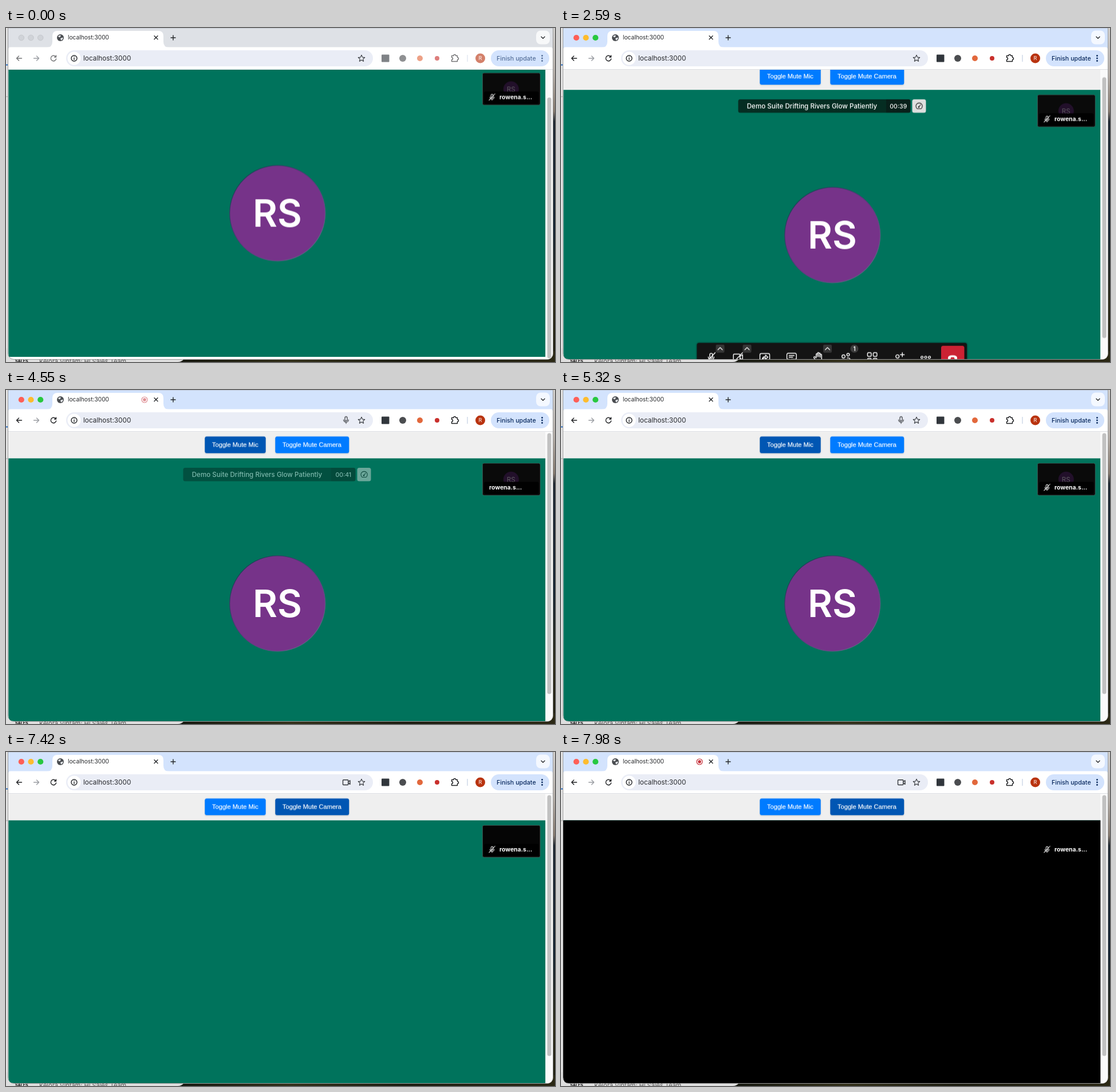
Write an HTML page that moves like this. It is 959 px wide and 584 px high and loops after 8000 ms.

```html
<!DOCTYPE html>
<html lang="en">
<head>
<meta charset="utf-8">
<title>Call controls demo</title>
<style>
  html, body { margin: 0; width: 100%; height: 100%; overflow: hidden; background: #e4e4e4; }
  svg { display: block; width: 959px; height: 584px; }
  text { font-family: Inter, "Open Sans", sans-serif; white-space: pre; }
  .mid { text-anchor: middle; }
  .btn text { font: 11.1px "Liberation Sans", Arial, sans-serif; fill: #fff; stroke: #fff; stroke-width: .2; }
  .line { fill: none; stroke: currentColor; stroke-width: 1.4; stroke-linecap: round; stroke-linejoin: round; }
  .thin { stroke-width: 1.1; }
  .call { color: #fff; }
  .call text { fill: #fff; }
  #tools { color: #1f2023; }
</style>
</head>
<body>
<svg viewBox="0 0 959 584" xmlns="http://www.w3.org/2000/svg">
  <defs>
    <clipPath id="pageClip"><path d="M4 73H955V569Q955 579 945 579H14Q4 579 4 569Z"/></clipPath>
    <clipPath id="stageClip"><rect x="4.4" y="119.5" width="938" height="505"/></clipPath>
    <linearGradient id="sideSky" x2="0" y2="1">
      <stop offset="0" stop-color="#d2d0ce"/><stop offset=".14" stop-color="#b5aea8"/>
      <stop offset=".25" stop-color="#85796e"/><stop offset=".28" stop-color="#1c2630"/>
      <stop offset=".6" stop-color="#132231"/><stop offset=".82" stop-color="#2b2a17"/>
      <stop offset="1" stop-color="#1d1c10"/>
    </linearGradient>
    <linearGradient id="ground">
      <stop offset="0" stop-color="#15170f"/><stop offset=".3" stop-color="#33301a"/>
      <stop offset=".6" stop-color="#1c1c10"/><stop offset="1" stop-color="#2b2815"/>
    </linearGradient>
    <linearGradient id="rim" x2="1" y2="1">
      <stop offset=".15" stop-color="#1d4458"/><stop offset=".5" stop-color="#5a3a7c"/>
      <stop offset=".85" stop-color="#5d6584"/>
    </linearGradient>
    <filter id="soft" x="-10%" y="-40%" width="120%" height="180%" color-interpolation-filters="sRGB">
      <feDropShadow dx="0" dy="1.3" stdDeviation="1.3" flood-opacity=".12"/>
    </filter>
    <filter id="glow" x="-5%" y="-20%" width="110%" height="140%" color-interpolation-filters="sRGB">
      <feDropShadow dx="0" dy="0" stdDeviation="1.6" flood-opacity=".75"/>
    </filter>
    <g id="mic" class="line">
      <path d="M-2.4-4.5a2.4 2.4 0 0 1 4.8 0v4a2.4 2.4 0 0 1-4.8 0zM-5-.5a5 5 0 0 0 10 0M0 4.5V7"/>
    </g>
    <g id="micOff"><use href="#mic"/><path class="line" d="M-7 7L7-8"/></g>
    <g id="cam" class="line">
      <rect x="-8" y="-5.5" width="11.5" height="11" rx="1.5"/><path d="M3.5-1.5L8-4.5V4.5L3.5 1.5"/>
    </g>
    <g id="camOff"><use href="#cam"/><path class="line" d="M-7 8L8-8"/></g>
    <g id="share" class="line">
      <rect x="-8.5" y="-6.5" width="17" height="13.5" rx="2.2"/>
      <path d="M-4.5 3.8Q-4-1.2 1.2-1.2V-3.8L5.5-.2L1.2 3.4V1Q-2.5 1-4.5 3.8Z"/>
    </g>
    <g id="chat" class="line">
      <path d="M-6-7H6a2.3 2.3 0 0 1 2.3 2.3V1.5A2.3 2.3 0 0 1 6 3.8H-.5L-4 7V3.8H-6A2.3 2.3 0 0 1-8.3 1.5V-4.7A2.3 2.3 0 0 1-6-7ZM-4.5-3H4.5M-4.5 0H2"/>
    </g>
    <g id="hand" class="line">
      <path d="M-4 1V-5a1.2 1.2 0 0 1 2.4 0V-1V-7a1.2 1.2 0 0 1 2.4 0V-1V-6a1.2 1.2 0 0 1 2.4 0V0V-4a1.2 1.2 0 0 1 2.4 0V3Q5.5 8 .5 8Q-3 8-5 5L-8 .8a1.2 1.2 0 0 1 2-1.3Z"/>
    </g>
    <g id="people" class="line">
      <circle cx="-3" cy="-1.5" r="2.8"/><circle cx="5" cy="-4.5" r="2.3"/>
      <path d="M-8.5 8Q-8.5 4-3 4Q2.5 4 2.5 8ZM3.5 1.2Q8.5.5 8.5 5H5"/>
    </g>
    <rect id="cell" class="line" width="6.5" height="6.5" rx="1.5"/>
    <g id="tiles">
      <use href="#cell" x="-8" y="-8"/><use href="#cell" x="2" y="-8"/>
      <use href="#cell" x="-8" y="2"/><use href="#cell" x="2" y="2"/>
    </g>
    <g id="invite" class="line">
      <circle cx="-2.5" cy="-1.5" r="2.9"/><path d="M-8 8Q-8 4-2.5 4Q3 4 3 8ZM6-8V-1M2.5-4.5H9.5"/>
    </g>
    <g id="more" class="line"><circle cx="-6.5" r="1.9"/><circle r="1.9"/><circle cx="6.5" r="1.9"/></g>
    <g id="notch">
      <rect x="-7.5" y="-7" width="15" height="14" rx="2" fill="#363636"/>
      <path class="line thin" d="M-4 2L0-2L4 2"/>
    </g>
  </defs>

  <!-- desktop behind the window -->
  <rect width="959" height="584" fill="#e4e4e4"/>
  <path d="M0 120H4" stroke="#aaa"/>
  <rect y="63.5" width="4" height="2" fill="#2d6fc4"/>
  <rect x="940" width="19" height="584" fill="url(#sideSky)"/>
  <rect x="300" y="565" width="659" height="19" fill="url(#ground)"/>
  <path d="M0 560H318Q314 584 300 584H0Z" fill="#dedede"/>
  <text x="16" y="584.5" font-size="7" font-weight="800" fill="#222">SALES</text>
  <text x="58" y="587" font-size="11" fill="#555">Kelora Vintam: Hi Sales Team</text>
  <rect x="3.5" y="-12" width="952" height="591.5" rx="10.5" fill="#fff" stroke="#9b9b9b"/>

  <!-- browser tab strip -->
  <rect id="strip" x="4" width="951" height="50" fill="#dee1e6"/>
  <path d="M4 .5H955" stroke="#b9bec8" opacity=".6"/>
  <rect x="4" y="33.5" width="951" height="39" rx="4" fill="#fff"/>
  <path d="M71 34Q81 34 81 24V14Q81 5 90 5H266Q275 5 275 14V24Q275 34 285 34Z" fill="#fff"/>
  <g id="lightsOff" fill="#d0d3d8" stroke="#bdc0c5" stroke-width=".7">
    <circle cx="26.8" cy="17" r="4.8"/><circle cx="43.5" cy="17" r="4.8"/><circle cx="60.2" cy="17" r="4.8"/>
  </g>
  <g id="lightsOn">
    <circle cx="26.8" cy="17" r="5.1" fill="#fe5f57"/><circle cx="43.5" cy="17" r="5.1" fill="#febc2e"/>
    <circle cx="60.2" cy="17" r="5.1" fill="#28c840"/>
  </g>
  <circle cx="95" cy="17" r="6" fill="#4a4d51"/>
  <path d="M91 14.5Q93 12 96 13L94.5 16Q92 17 91 14.5ZM95 18L99.5 16.5Q100 20 96 21.5Z" fill="#e8eaed"/>
  <text x="108" y="20.3" font-size="10.2" fill="#26282b">localhost:3000</text>
  <g id="rec">
    <circle cx="242" cy="17" r="5" fill="none" stroke="#c5303a" stroke-width="1.2"/><circle cx="242" cy="17" r="2.8" fill="#c5303a"/>
  </g>
  <path class="line" color="#26282b" d="M259 13.8L265 19.8M265 13.8L259 19.8M288 17H296M292 13V21"/>
  <rect x="926" y="4.5" width="24" height="24" rx="8" fill="#fff" opacity=".75"/>
  <path class="line" color="#26282b" d="M935 15.2L938 18.2L941 15.2"/>

  <!-- browser toolbar -->
  <rect x="105" y="39" width="536" height="28" rx="14" fill="#eaedf6"/>
  <circle cx="119" cy="53" r="11.5" fill="#fff"/>
  <g class="line" color="#26282b"><circle cx="119" cy="53" r="5"/><path d="M119 52.5V55.5M119 50.3V50.4"/></g>
  <text x="135" y="57" font-size="11.8" fill="#26282b">localhost:3000</text>
  <path class="line" color="#9a9da2" d="M48.5 53H57.5M53.5 49L57.5 53L53.5 57"/>
  <path class="line thin" color="#33363a" d="M621 47.3L622.7 51.1L626.8 51.5L623.7 54.2L624.6 58.2L621 56.1L617.4 58.2L618.3 54.2L615.2 51.5L619.3 51.1Z"/>
  <g color="#33363a">
    <g id="urlMic"><use href="#mic" transform="translate(594 52.5) scale(.85)"/></g>
    <g id="urlCam" class="line">
      <rect x="588.5" y="48.7" width="9.3" height="8.8" rx="1"/><path d="M598.2 51.8L601 49.8V56.4L598.2 54.4"/>
    </g>
  </g>
  <rect x="847" y="39" width="102" height="28" rx="14" fill="#d3e3fd"/>
  <g id="tools">
    <path class="line" d="M27.5 53H18.5M22.5 49L18.5 53L22.5 57M87 50.5A4.7 4.7 0 1 0 87.6 54M87.5 48V51H84.5"/>
    <rect x="656" y="46.5" width="13.5" height="13" rx="1" fill="#31363c"/>
    <circle cx="693" cy="53" r="6" fill="#4b4d50"/>
    <circle cx="723" cy="53" r="5" fill="#e2683c"/>
    <circle cx="753" cy="53" r="4" fill="#c9302c"/>
    <path class="line" d="M778.5 48.5H781.8A2 2 0 0 1 785.8 48.5H788.5V51.5A2 2 0 0 1 788.5 55.5V58.5H778.5V55.5A2 2 0 0 0 778.5 51.5Z"/>
    <path d="M806 47V59" stroke="#b7c6dd"/>
    <circle cx="828.5" cy="53" r="8.5" fill="#b9330f"/>
    <text class="mid" x="828.5" y="56.3" font-size="9" fill="#fff">R</text>
    <text x="857" y="56.9" font-size="10.7" font-weight="500" fill="#0a2a5e">Finish update</text>
    <g fill="#0a2a5e"><circle cx="936.5" cy="48.5" r="1.4"/><circle cx="936.5" cy="53" r="1.4"/><circle cx="936.5" cy="57.5" r="1.4"/></g>
  </g>
  <path d="M4 72.5H955" stroke="#dcdee2"/>

  <!-- web page -->
  <g clip-path="url(#pageClip)">
    <g id="page">
      <rect x="4.4" y="73" width="938" height="47" fill="#efefef"/>
      <g class="btn">
        <g filter="url(#soft)"><rect id="micBtn" x="347.3" y="81.3" width="106.4" height="29.2" rx="3.5"/></g>
        <text x="360" y="99.7">Toggle Mute Mic</text>
        <g filter="url(#soft)"><rect id="camBtn" x="470.3" y="81.3" width="129" height="29.2" rx="3.5"/></g>
        <text x="483" y="99.7">Toggle Mute Camera</text>
      </g>
      <rect x="4.4" y="119.5" width="938" height="505" fill="#00735c"/>
      <g class="call" clip-path="url(#stageClip)">
        <g id="avatar">
          <circle cx="474.2" cy="373.3" r="83.5" fill="#763389" stroke="url(#rim)" stroke-width="1.3"/>
          <text class="mid" x="474" y="397.4" font-size="66" font-weight="600">RS</text>
        </g>
        <rect id="video" x="4" y="119.5" width="939" height="505"/>

        <rect id="tileEdge" x="832.5" y="128.3" width="100.5" height="55.7" rx="2.5" fill="#050505" stroke="#4c5653" stroke-width=".8"/>
        <g id="tileAvatar">
          <rect x="833" y="128.8" width="99.500" height="54.7" rx="2" fill="#0a0a0a"/>
          <circle cx="882.3" cy="156.3" r="13.5" fill="#22102a"/>
          <text class="mid" x="882.2" y="160.5" font-size="11.5" style="fill:#5e5a60">RS</text>
        </g>
        <rect x="835" y="160.5" width="95.5" height="21.5" rx="3" fill-opacity=".9"/>
        <g id="tileMic"><use href="#micOff" transform="translate(849 170.5) scale(.74)"/></g>
        <text id="tileName" x="862" y="174.3" font-size="10.4" font-weight="700">rowena.s...</text>

        <g id="subject">
          <path d="M313 136H568V159.500H313Q309.500 159.500 309.500 156V139.500Q309.500 136 313 136Z" fill="#06291f" fill-opacity=".94"/>
          <path d="M568 136H607Q610.500 136 610.500 139.500V156Q610.500 159.500 607 159.500H568Z" fill="#08201a"/>
          <text class="mid" x="438.5" y="152" font-size="11.6" font-weight="500">Demo Suite Drifting Rivers Glow Patiently</text>
          <g id="clock" font-size="10.5" font-weight="500"></g>
          <rect x="613.5" y="136" width="24" height="23.5" rx="3.5" fill="#dedfde"/>
          <g class="line thin" color="#222">
            <path d="M622.3 152.5A5.6 5.6 0 1 1 628.9 152.5ZM625.6 148.800L628 145.5"/><circle cx="625" cy="149.4" r=".8"/>
          </g>
        </g>

        <g id="bar">
          <rect x="237.5" y="562" width="471.5" height="50" rx="3.5" fill="#141414" filter="url(#glow)"/>
          <g id="icons"></g>
          <circle cx="512.5" cy="572" r="7" fill="#3d3d3d"/>
          <text class="mid" x="512.5" y="575.6" font-size="10" font-weight="600">1</text>
          <rect x="664" y="567" width="40.5" height="40" rx="3.5" fill="#cb2233"/>
          <path fill="#fff" d="M676 588Q676 583.5 684 583.5Q692 583.5 692 588V589.5Q691.5 590.8 690.3 590.5L687.8 589.8Q687 589.5 687 588.5V587.3Q684 586.5 681 587.3V588.5Q681 589.5 680.2 589.8L677.7 590.5Q676.5 590.8 676 589.5Z"/>
        </g>
      </g>
    </g>
    <rect x="942.4" y="73" width="13" height="507" fill="#fafafa"/>
    <rect id="thumb" x="945.5" y="75.5" width="7" height="456" rx="3.5" fill="#c1c1c1"/>
  </g>
</svg>
<script>
  const LOOP = 8000;
  const HOLD = 'steps(1, end)';
  const $ = id => document.getElementById(id);

  // steps: [ms, value, easing towards the next step]
  function play(id, prop, steps) {
    const frames = steps.map(([ms, value, easing = HOLD]) => ({ offset: ms / LOOP, [prop]: value, easing }));
    frames.push({ offset: 1, [prop]: steps[steps.length - 1][1] });
    $(id).animate(frames, { duration: LOOP, iterations: Infinity });
  }
  const show = (id, from, to = LOOP) => play(id, 'opacity',
    [...(from > 0 ? [[0, 0]] : []), [from, 1], ...(to < LOOP ? [[to, 0]] : [])]);
  const moveY = y => `translate(0px, ${y}px)`;

  const icons = ['micOff', 'camOff', 'share', 'chat', 'hand', 'people', 'tiles', 'invite', 'more'];
  $('icons').innerHTML =
    icons.map((name, i) => `<use href="#${name}" x="${262.3 + i * 46.85}" y="587"/>`).join('') +
    [278, 325, 465.5].map(x => `<use href="#notch" x="${x}" y="572"/>`).join('');

  const ticks = [0, 1260, 2310, 3360, 4410, LOOP];
  $('clock').innerHTML = ticks.slice(1).map((_, i) =>
    `<text id="tick${i}" class="mid" x="589.3" y="151.7">00:${37 + i}</text>`).join('');
  ticks.slice(1).forEach((end, i) => show('tick' + i, ticks[i], end));

  // window gains focus
  const FOCUS = 280;
  play('strip', 'fill', [[0, '#dee1e6'], [FOCUS, '#d3e3fd']]);
  play('tools', 'opacity', [[0, .62], [FOCUS, 1]]);
  show('lightsOff', 0, FOCUS);
  show('lightsOn', FOCUS);

  // call controls come and go
  play('bar', 'transform', [[0, moveY(68)], [400, moveY(68), 'ease-in'], [700, moveY(0)],
    [4150, moveY(0), 'ease-in'], [4450, moveY(68)]]);
  play('subject', 'opacity', [[0, 0], [390, 0, 'ease-in'], [980, 1], [4150, 1, 'ease-in'], [4750, 0]]);

  // scroll to the top
  const glide = 'cubic-bezier(.1, .7, .3, 1)';
  const scroll = (id, far, near) => play(id, 'transform',
    [[0, moveY(far)], [2400, moveY(far), 'linear'], [2590, moveY(near), glide], [3150, moveY(0)]]);
  scroll('page', -49.5, -11.5);
  scroll('thumb', 46, 10.7);

  // button hover
  const BLUE = '#007bff', DARK = '#0056b3';
  play('micBtn', 'fill', [[0, BLUE], [3340, BLUE, 'ease'], [3640, DARK], [5950, DARK, 'ease'], [6250, BLUE]]);
  play('camBtn', 'fill', [[0, BLUE], [6050, BLUE, 'ease'], [6350, DARK]]);

  // microphone on and off again
  const ON = 4550, OFF = 5110;
  play('tileMic', 'opacity', [[0, 1], [ON, 0], [OFF, 1]]);
  play('tileName', 'transform', [[0, 'translate(0px, 0px)'], [ON, 'translate(-18px, 0px)'], [OFF, 'translate(0px, 0px)']]);
  show('urlMic', 4200, 6900);

  // camera on
  show('urlCam', 6900);
  show('avatar', 0, 7070);
  show('tileAvatar', 0, 7070);
  play('video', 'opacity', [[0, 0], [7490, 0, 'linear'], [7790, 1]]);
  play('tileEdge', 'opacity', [[0, 1], [7490, 1, 'linear'], [7790, 0]]);

  // recording light throbs
  const throb = [[0, 0]];
  for (let i = 0; i < 8; i++) throb.push([4280 + i * 520, i % 2, 'ease-in-out']);
  play('rec', 'opacity', throb);
</script>
</body>
</html>
```
